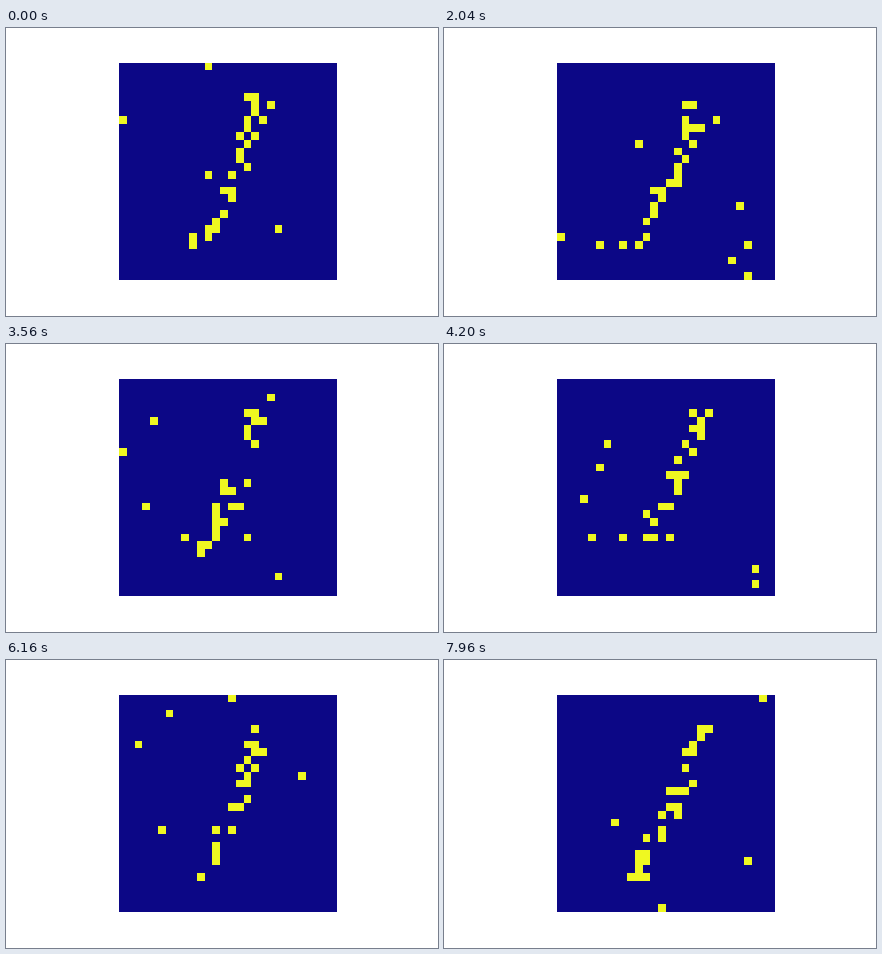
Recreate the animation shown at these times as a matplotlib script. Size 432x288 px, loop 8 s.

```python
import numpy as np
import matplotlib.pyplot as plt
from matplotlib.animation import FuncAnimation

FRAMES, STEP_MS, SIZE = 200, 40, 28
TOP, BOTTOM = 4, 23
STROKE_RATE, NOISE_RATE = 0.4, 0.0085


def firing_rates():
    """Spike probability per cell: a bent, slanted stroke over weak noise."""
    rows, cols = np.mgrid[:SIZE, :SIZE]
    drop = rows - TOP
    centre = 17.5 - 0.22 * drop - 0.0098 * drop**2
    stroke = np.clip(1.9 - np.abs(cols - centre), 0, 1)
    stroke *= (rows >= TOP) & (rows <= BOTTOM)
    return np.maximum(STROKE_RATE * stroke, NOISE_RATE)


rates = firing_rates()


def spikes(i):
    """Independent spikes at step i, the same in every loop."""
    return (np.random.default_rng(i).random(rates.shape) < rates).astype(float)


fig = plt.figure(figsize=(6, 4), dpi=72, facecolor="white")
fig.subplots_adjust(left=0.125, right=0.9, bottom=0.125, top=0.88)
ax = fig.add_subplot()
ax.axis("off")
image = ax.imshow(spikes(0), cmap="plasma", vmin=0, vmax=1,
                  interpolation="nearest")


def update(i):
    image.set_data(spikes(i))
    return [image]


anim = FuncAnimation(fig, update, frames=FRAMES, interval=STEP_MS,
                     repeat=True, repeat_delay=0, blit=False)
plt.show()
```
